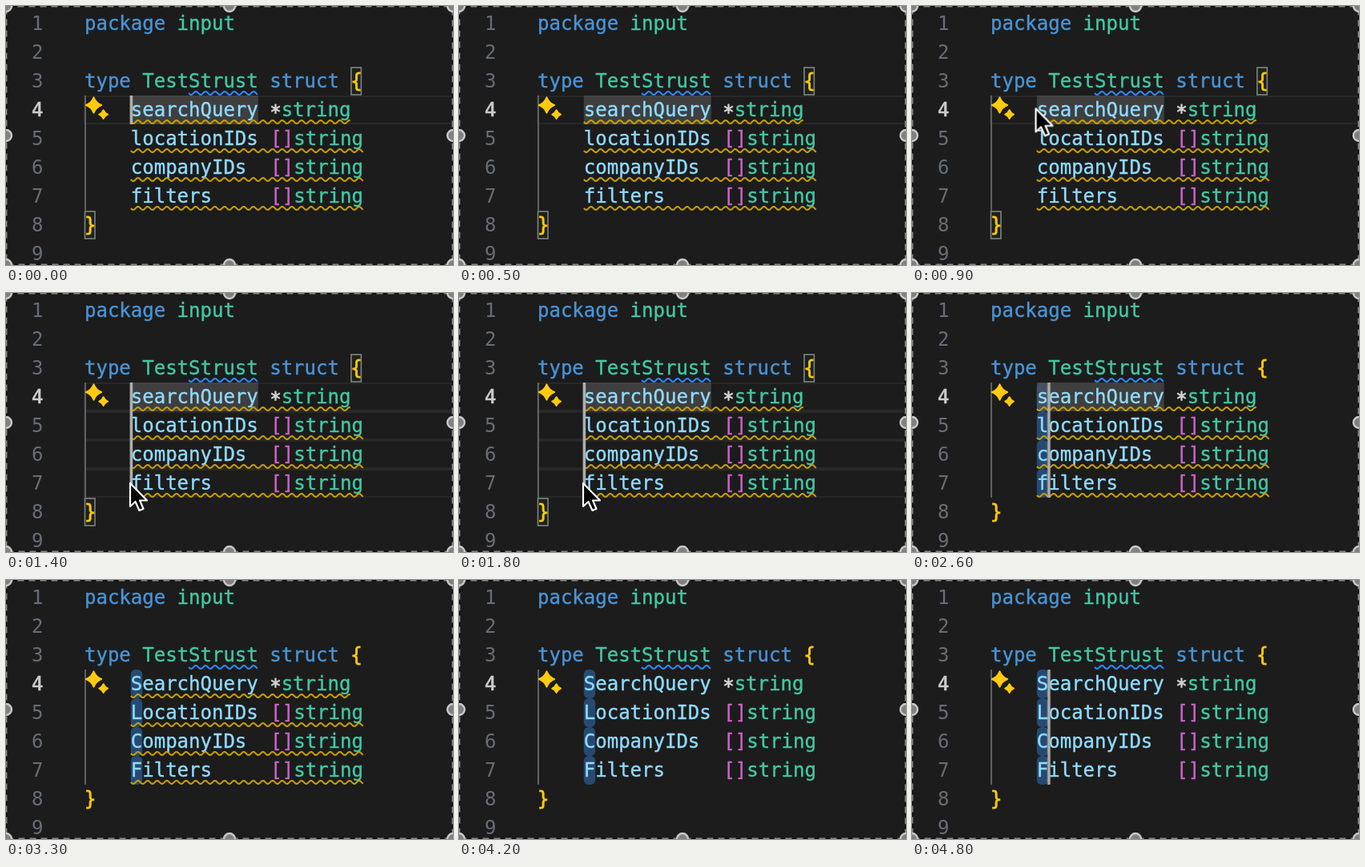
An HTML page that plays this animation: 558x324 px, repeating every 4.9 s.

```html
<!DOCTYPE html>
<html lang="en">
<head>
<meta charset="utf-8">
<title>Column selection in a code editor</title>
<style>
html, body { margin: 0; width: 100%; height: 100%; overflow: hidden; background: #1c1c1c; }
svg { display: block; width: 558px; height: 324px; }
text {
  font: 24px "DejaVu Sans Mono", monospace;
  white-space: pre;
  fill: currentColor;
  stroke: currentColor;
  stroke-width: 0.4;
}
.num { color: #676d78; stroke-width: 0; }
.active { color: #cccccc; stroke-width: 0.7; }
.key { color: #4a94d6; }
.type { color: #43c8a5; }
.field { color: #90dbff; }
.gold { color: #ffca10; stroke-width: 0.8; }
.pink { color: #cf62cb; }
.op { color: #d4d4d4; stroke-width: 0.8; }
.star { fill: #ffca10; stroke: #ffca10; stroke-width: 2; stroke-linejoin: round; }
.wave { fill: none; stroke-width: 2; }
.warn { stroke: #c79f08; }
.info { stroke: #2f8bff; }

/* One loop is 4900 ms; the selection is made at 2400 ms. */
.before, .after, .word, .lower, .upper, .warnings, .blink, .carets, .r5, .r6, .r7 {
  animation: 4900ms step-end infinite;
}
.before { animation-name: before; }
.after { animation-name: after; }
.word, .lower { animation-name: lower; }
.upper { animation-name: upper; }
.warnings { animation-name: warnings; }
.blink { animation-name: blink; }
.carets { animation-name: step; }
.r5 { animation-name: r5; }
.r6 { animation-name: r6; }
.r7 { animation-name: r7; }
.pointer { animation: seen 4900ms step-end infinite, drag 4900ms linear infinite; }

@keyframes before { 0% { opacity: 1 } 48.97%, 100% { opacity: 0 } }
@keyframes after { 0% { opacity: 0 } 48.97%, 100% { opacity: 1 } }
@keyframes lower { 0% { opacity: 1 } 63.25%, 100% { opacity: 0 } }
@keyframes upper { 0% { opacity: 0 } 63.25%, 100% { opacity: 1 } }
@keyframes warnings { 0% { opacity: 1 } 81.62%, 100% { opacity: 0 } }
@keyframes blink {
  0%, 20.4%, 48.97%, 69.38%, 89.79%, 100% { opacity: 1 }
  10.2%, 38.77%, 59.18%, 79.59% { opacity: 0 }
}
@keyframes step { 0% { transform: none } 48.97%, 100% { transform: translateX(14.45px) } }
@keyframes r5 { 0% { opacity: 0 } 20.4%, 100% { opacity: 1 } }
@keyframes r6 { 0% { opacity: 0 } 22.44%, 100% { opacity: 1 } }
@keyframes r7 { 0% { opacity: 0 } 24.48%, 100% { opacity: 1 } }
@keyframes seen { 0% { opacity: 0 } 14.28% { opacity: 1 } 48.97%, 100% { opacity: 0 } }
@keyframes drag {
  0%, 18.37% { transform: translate(154.5px, 128px) }
  24.49%, 100% { transform: translate(155px, 238px) }
}
</style>
</head>
<body>
<svg id="stage" viewBox="0 0 558 324"></svg>
<script>
const charW = 14.45, rowH = 36, left = 98;
const sliceCol = 16.08; // the slice types sit a little right of the grid
const colX = c => left + c * charW;
const rowY = r => 4 + (r - 1) * rowH;
const rows = [4, 5, 6, 7];

const group = (cls, body) => `<g class="${cls}">${body}</g>`;
const rect = (x, y, w, h, attrs) => `<rect x="${x}" y="${y}" width="${w}" height="${h}" ${attrs}/>`;
const textAt = (x, row, str, cls, dy = 0) =>
  `<text x="${x}" y="${rowY(row) + 26 + dy}" class="${cls}">${str}</text>`;
const code = (col, row, str, cls, dy) => textAt(colX(col), row, str, cls, dy);

function wave(row, from, to, cls) {
  const start = colX(from), y = rowY(row) + 33;
  let d = '';
  for (let x = 0; x <= colX(to) - start; x += 1) {
    d += `${x ? 'L' : 'M'}${start + x} ${(y + 2 * Math.sin(x * Math.PI / 6)).toFixed(2)}`;
  }
  return `<path class="wave ${cls}" d="${d}"/>`;
}

function star(x, y, r) {
  const k = r * 0.28;
  return `<path class="star" d="M${x} ${y - r}
    Q${x + k} ${y - k} ${x + r} ${y}Q${x + k} ${y + k} ${x} ${y + r}
    Q${x - k} ${y + k} ${x - r} ${y}Q${x - k} ${y - k} ${x} ${y - r}Z"/>`;
}

const lineMark = row => group(`r${row}`,
  rect(left, rowY(row) + 1, 460, rowH - 2, 'fill="none" stroke="#282828" stroke-width="2"'));
const bracketBox = (col, row) =>
  rect(colX(col) + 0.5, rowY(row) + 1, 12.5, 34, 'fill="#1b231b" stroke="#828282" stroke-width="1.6"');

const fields = ['searchQuery', 'locationIDs', 'companyIDs', 'filters'];
const fieldText = fields.map((name, i) => {
  const row = rows[i];
  return group('lower', code(4, row, name[0], 'field'))
    + group('upper', code(4, row, name[0].toUpperCase(), 'field'))
    + code(5, row, name.slice(1), 'field')
    + (i ? code(sliceCol, row, '[]', 'pink') + code(sliceCol + 2, row, 'string', 'type')
         : code(16, row, '*', 'op', 3) + code(17, row, 'string', 'type'));
}).join('');

const numbers = [1, 2, 3, 4, 5, 6, 7, 8, 9]
  .map(n => textAt(32, n, n, n === 4 ? 'active' : 'num')).join('');

const selection = rows.map(r => rect(colX(4), rowY(r), charW, rowH, 'rx="6" fill="#264a72"')).join('');
const carets = rows.map(r => group(`r${r}`, rect(154.6, rowY(r), 3.6, rowH, 'fill="#aeafad"'))).join('');

const frame = rect(0.5, 0.5, 557, 323, 'fill="none" stroke="#0c0c0c" stroke-width="2"')
  + rect(0.5, 0.5, 557, 323, 'fill="none" stroke="#858585" stroke-width="2" stroke-dasharray="8 6"');
const handles = [0, 279, 558].flatMap(x => [0, 162, 324].map(y =>
  x === 279 && y === 162 ? '' :
  `<circle cx="${x}" cy="${y}" r="7" fill="#808080" stroke="#c8c8c8" stroke-width="2.4"/>`)).join('');

document.getElementById('stage').innerHTML =
  rect(0, 0, 558, 324, 'fill="#1c1c1c"')
  + group('before', rows.map(lineMark).join('') + bracketBox(23, 3) + bracketBox(0, 8))
  + group('after', selection)
  + group('word', rect(colX(4), rowY(4), 11 * charW, rowH, 'fill="#575757" fill-opacity=".6"'))
  + rect(left, rowY(4), 2, 4 * rowH, 'fill="#606060"')
  + numbers
  + code(0, 1, 'package', 'key') + code(8, 1, 'input', 'type')
  + code(0, 3, 'type', 'key') + code(5, 3, 'TestStrust', 'type')
  + code(16, 3, 'struct', 'key') + code(23, 3, '{', 'gold')
  + fieldText
  + code(0, 8, '}', 'gold')
  + wave(3, 9, 15, 'info')
  + group('warnings', rows.map(r => wave(r, 4, r === 4 ? 23 : sliceCol + 8, 'warn')).join(''))
  + star(109.5, 124, 9.6) + star(121.6, 135.6, 5.4)
  + group('blink', group('carets', carets))
  + frame + handles
  + group('pointer', `<path d="M0 0V29L6.5 23L11.5 34L16.5 32L12 21.5H21Z"
      fill="#000" stroke="#fff" stroke-width="2.2" stroke-linejoin="round"/>`);
</script>
</body>
</html>
```
